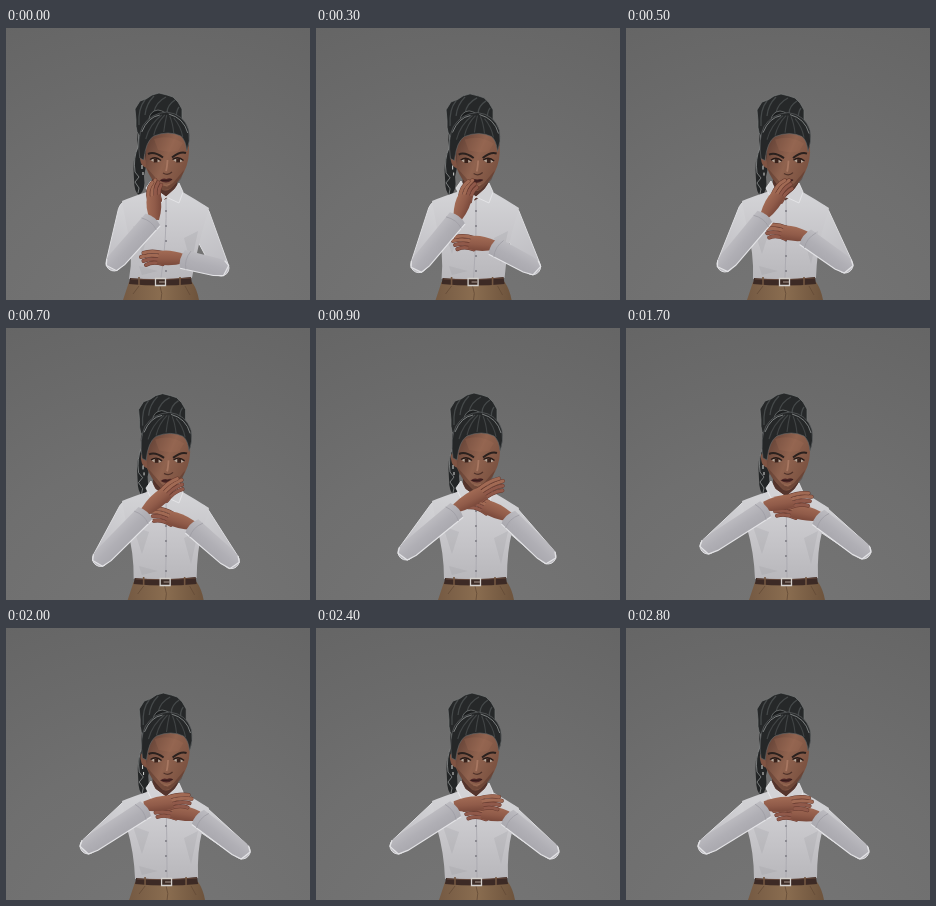
These frames come from a looping animation (304x272 px, 2900 ms). An HTML page with a canvas:

```html
<!DOCTYPE html>
<html lang="en">
<head>
<meta charset="utf-8">
<title>Thinking pose</title>
<style>
html, body { margin: 0; width: 100%; height: 100%; overflow: hidden; background: #6b6b6b; }
canvas { display: block; width: 304px; height: 272px; }
</style>
</head>
<body>
<canvas id="stage" width="304" height="272"></canvas>
<script>
const ctx = document.getElementById('stage').getContext('2d');
const LOOP = 2900, STEP = 100;

// time, hair dx, face dx, waist dx, then x,y of left elbow, wrist, fingertips and the same for right
const poses = [
  [0,    -5, -1, -5, 108, 235, 149, 190, 149, 152, 215, 240, 174, 231, 135, 231],
  [500,  -3,  0, -1,  99, 236, 141, 187, 164, 153, 219, 237, 177, 208, 139, 203],
  [900,   0,  0,  0,  90, 224, 143, 181, 188, 155, 232, 228, 190, 188, 150, 172],
  [1300,  0,  0,  1,  83, 219, 142, 180, 188, 166, 237, 223, 190, 188, 148, 179],
  [1700,  0,  0,  1,  82, 218, 142, 180, 186, 171, 237, 223, 190, 188, 147, 181],
  [2400, -2, -1,  1,  82, 218, 142, 180, 186, 175, 235, 223, 189, 188, 148, 184],
  [2800, -3, -1,  0,  80, 218, 142, 180, 186, 176, 235, 223, 189, 188, 148, 185]
];

// Cubic Hermite through the poses, with slopes taken from the neighbours
function poseAt(time) {
  const i = Math.min(poses.length - 2, poses.filter(p => p[0] <= time).length - 1);
  const a = poses[i], b = poses[i + 1], span = b[0] - a[0], k = (time - a[0]) / span;
  const slope = (j, n) => {
    const p = poses[Math.max(0, j - 1)], q = poses[Math.min(poses.length - 1, j + 1)];
    return (q[n] - p[n]) / (q[0] - p[0]) * span;
  };
  return a.map((v, n) => {
    const d = b[n] - v, s = slope(i, n), e = slope(i + 1, n);
    return v + k * (s + k * (3 * d - 2 * s - e + k * (s + e - 2 * d)));
  });
}

function shape(d, fill, stroke, width = 1) {
  const path = new Path2D(d);
  if (fill) { ctx.fillStyle = fill; ctx.fill(path); }
  if (stroke) { ctx.strokeStyle = stroke; ctx.lineWidth = width; ctx.stroke(path); }
}

function blend(x0, y0, x1, y1, ...colors) {
  const g = ctx.createLinearGradient(x0, y0, x1, y1);
  colors.forEach((c, i) => g.addColorStop(i / (colors.length - 1), c));
  return g;
}

function shifted(dx, dy, draw) {
  ctx.save();
  ctx.translate(dx, dy);
  draw();
  ctx.restore();
}

function limb(x0, y0, r0, x1, y1, r1, fill, rim) {
  const a = Math.atan2(y1 - y0, x1 - x0), q = Math.PI / 2;
  ctx.beginPath();
  ctx.arc(x0, y0, r0, a + q, a - q);
  ctx.arc(x1, y1, r1, a - q, a + q);
  ctx.closePath();
  ctx.fillStyle = fill;
  ctx.fill();
  ctx.strokeStyle = rim;
  ctx.lineWidth = 1;
  ctx.stroke();
}

function sleeve(ex, ey, wx, wy, side) {
  const len = Math.hypot(wx - ex, wy - ey);
  ctx.save();
  ctx.translate(ex, ey);
  ctx.rotate(Math.atan2(wy - ey, wx - ex));
  ctx.scale(1, -side);
  const fill = blend(0, -10, 0, 10, '#bcbbc0', '#b0afb5', '#a9a8ae');
  shape(`M-7 -4L-2 -8L5 -9L${len - 3} -10Q${len + 2} 0 ${len - 2} 9L6 9L-4 7Z`, fill);
  shape(`M${len - 2} 9L6 9L-4 7L-7 -4L-2 -8`, null, '#e3e3e6', 1.2);
  shape(`M${len - 9} -10Q${len - 4} 0 ${len - 8} 9`, null, '#a09fa6', .8);
  ctx.restore();
}

function hand(wx, wy, tx, ty, flip, curl) {
  const len = Math.hypot(tx - wx, ty - wy), palm = len * .52;
  ctx.save();
  ctx.translate(wx, wy);
  ctx.rotate(Math.atan2(ty - wy, tx - wx));
  ctx.scale(1, flip);
  ctx.lineCap = 'round';
  for (let i = 3; i >= 0; i--) {
    const y = -6 + i * 3.7, reach = len - Math.abs(i - 1) * 2.5;
    const d = `M${palm - 3} ${y}Q${(palm + reach) / 2} ${y - 3} ${reach} ${y * (1.15 - curl * .5) + curl * 3}`;
    shape(d, null, '#65392e', 4);
    shape(d, null, i < 2 ? '#a16a54' : '#90594a', 3.1);
  }
  shape(`M-4 -5Q${palm * .5} -10 ${palm} -8L${palm + 3} 5Q${palm * .5} 8 -4 4Z`,
    blend(0, -8, 0, 8, '#a16a54', '#905b49', '#744437'));
  ctx.restore();
}

function backdrop() {
  const g = ctx.createRadialGradient(152, 330, 30, 152, 330, 370);
  g.addColorStop(0, '#757575');
  g.addColorStop(.5, '#6f6f6f');
  g.addColorStop(1, '#656565');
  ctx.fillStyle = g;
  ctx.fillRect(0, 0, 304, 272);
}

function backHair() {
  shape('M142 92Q134 104 137 119Q131 130 133 151Q133 164 138 167Q145 163 143 148L151 108Z', '#232526');
  shape('M138 101L137 119Q132 130 134 144L138 149L134 154L138 160L137 165', null, '#9b9e9e', .7);
  shape('M151 67L158 65L166 67L172 69L177 74L181 81L181 94L176 103L148 100L141 110Q134 106 135 92L134 81L139 73L145 71Z', '#262829', '#777a7a', .7);
  shape('M144 72Q137 80 138 97M153 68Q145 76 144 87M165 69Q155 74 153 84M174 72Q166 77 166 85M178 79Q174 84 176 93', null, '#45494a', 1.3);
  shape('M148 91Q149 83 157 82Q165 83 168 90Z', '#1b1d1e', '#6f7373', .8);
}

function face() {
  shape('M147 151L172 151L172 164L159 172L147 165Z', '#55352d');
  shape('M140 126Q134 123 135 131Q136 139 142 140Z', '#805443');
  shape('M140 113Q148 102 163 103Q179 103 184 117Q185 132 179 144Q173 155 165 161Q159 165 154 159Q145 150 141 140Z',
    blend(139, 120, 184, 139, '#644236', '#90634f', '#79503f'));
  shape('M149 111Q164 106 178 115L173 123L164 124L153 122Z', 'rgba(164,112,88,.25)');
  shape('M142 140Q150 149 156 156L162 159L168 155L179 142L176 151Q165 165 155 161Q145 152 142 140Z', 'rgba(72,42,34,.35)');
  shape('M143 126Q149 123 158 129.5M167 129.5Q175 123 181 125', null, '#2b211e', 2);
  for (const x of [150.5, 173]) {
    shape(`M${x - 5} 132Q${x} 128 ${x + 5} 133Q${x} 136 ${x - 5} 132Z`, '#b5a598');
    shape(`M${x - 1.8} 130.5h3.8v4h-3.8Z`, '#38211a');
    shape(`M${x - 5.5} 131.5Q${x} 127.5 ${x + 5.5} 132.5`, null, '#271b18', 1.4);
  }
  shape('M162.5 132Q162 140 161 143', null, '#a87862', 1.8);
  shape('M158 145Q163 148 167 144', null, '#50332a', 1.2);
  shape('M154.5 152.5Q158 149.5 161.5 151Q165 149.5 167.5 151.5Q162 157 154.5 152.5Z', '#4d2727');
  shape('M156 152.5Q162 153 167 151.5', null, '#2f1a18', .8);
  shape('M158 157Q162 158 165 156', null, '#a07059', .8);
  shape('M137 137v4M138 144v3', null, '#d9d9d6');
}

function frontHair() {
  shape('M137 130Q134 110 140 98Q148 85 164 84Q181 86 186 102Q188 113 184 123Q183 112 178 108Q166 102 151 108Q143 113 141 132Z', '#252728', '#66696a', .6);
  shape('M143 111Q147 96 159 87M151 107Q154 95 162 87M161 104Q162 95 164 87M171 105Q170 95 167 88M180 109Q178 98 171 90', null, '#414445', 1.1);
  shape('M139 104Q145 89 157 87M166 86Q181 90 185 105', null, '#8f9292', .8);
}

function lowerBody(dx) {
  shifted(dx, 0, () => {
    shape('M128 254L191 254Q196 261 198 272H122Z', blend(122, 0, 198, 0, '#755a43', '#8a6d50', '#6d533c'));
    shape('M159 258Q162 266 160 272M138 258L132 266M184 258L189 267', null, '#644b36', .8);
  });
}

function torso(dx) {
  const x = n => n + dx;
  shape(`M144 163Q128 168 116 173L121 200Q128 224 ${x(128)} 251Q${x(159)} 253 ${x(191)} 250Q191 223 196 204L203 180Q189 171 175 163L160 170Z`,
    blend(0, 170, 0, 250, '#d2d2d5', '#c6c5c9', '#b9b8bc'));
  shape('M127 198L143 204L136 226ZM192 203L178 210L185 236ZM133 238L152 243L136 247Z', 'rgba(150,149,156,.22)');
  shape(`M160 170Q161 211 ${x(160)} 250`, null, '#abaab0', .9);
  for (let y = 182; y < 246; y += 15) shape(`M159 ${y}h2v2h-2Z`, '#8b8a91');
  shifted(dx, 0, () => {
    shape('M129 250Q160 253 190 249L191 256Q160 259 128 256Z', '#3c2a25');
    shape('M130 251Q160 253 190 250', null, '#70503f', .7);
    shape('M154.5 250.5h10v7h-10Z', '#3c2c26', '#d3d0cc', 1.3);
    shape('M158 254h6', null, '#a99990');
    shape('M138 249v8M179 249v8', null, '#735742', 1.6);
  });
}

function collar() {
  shape('M145 153L140 160L145 170L154 176L160 169L149 161Z', '#d3d3d6', '#eeeeef', .8);
  shape('M173 155L177 164L173 175L160 169L169 161Z', '#d1d1d4', '#e9e9eb', .8);
}

function draw(time) {
  const [, hair, head, waist, lex, ley, lwx, lwy, ltx, lty, rex, rey, rwx, rwy, rtx, rty] = poseAt(time);
  const bob = time < 900 ? Math.sin(time / 900 * Math.PI) : 0;
  backdrop();
  shifted(hair, bob, backHair);
  lowerBody(waist);
  limb(124, 184, 12, lex, ley, 8, blend(lex, ley, 124, 184, '#c0bfc4', '#d2d2d5'), '#dfdfe2');
  limb(192, 188, 12, rex, rey, 8, blend(192, 188, rex, rey, '#cfcfd2', '#bebdc2'), '#dcdcdf');
  torso(waist);
  shifted(head, bob * .6, face);
  shifted(hair * .65, bob * .6, frontHair);
  collar();
  hand(rwx, rwy, rtx, rty, -1, .15);
  sleeve(rex, rey, rwx, rwy, 1);
  hand(lwx, lwy - 2, ltx, lty, 1, Math.max(.1, .7 - time / 1500));
  sleeve(lex, ley, lwx, lwy, -1);
}

function tick() {
  draw(Math.floor(performance.now() % LOOP / STEP) * STEP);
  requestAnimationFrame(tick);
}
tick();
</script>
</body>
</html>
```
